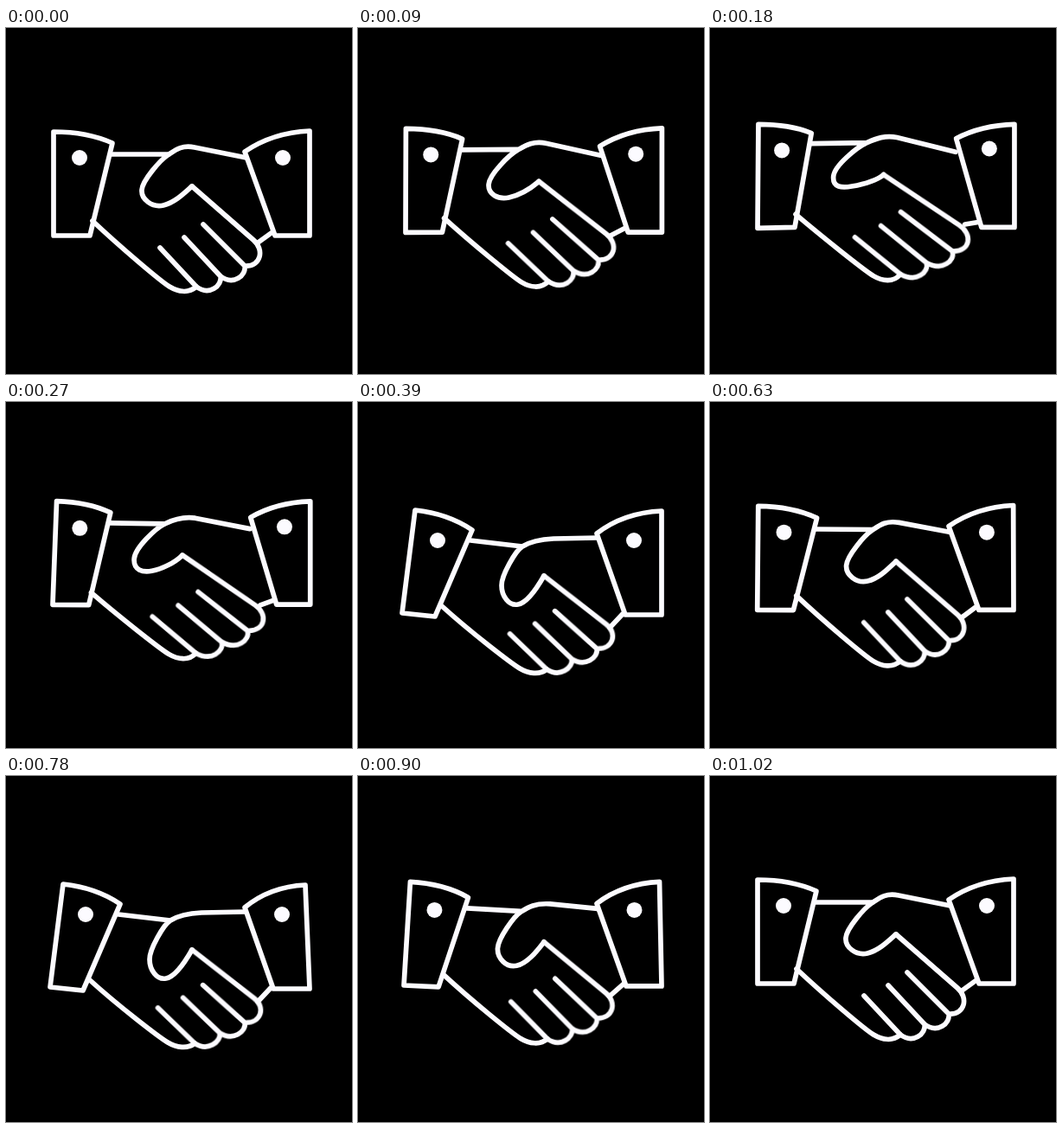
An HTML page without scripts for the animation above (3050 ms loop, 400 by 400 pixels).

```html
<!DOCTYPE html>
<html lang="en">
<head>
<meta charset="utf-8">
<title>Handshake</title>
<style>
html, body { margin: 0; width: 100%; height: 100%; overflow: hidden; background: #000; }
svg { display: block; width: 100%; height: 100%; }

path {
  fill: none;
  stroke: #fcfbff;
  stroke-width: 5.7;
  stroke-linecap: round;
  stroke-linejoin: round;
  vector-effect: non-scaling-stroke;
  animation: shake 3050ms cubic-bezier(.37, 0, .63, 1) infinite;
}

/* Each part names its poses; the shared keyframes time them. */
.cuff { marker-start: url(#button); }
#left {
  --rest: path("M85 150h0M55 120Q94 120 123 133L97 240L55 240Z");
  --up: path("M83 141h0M56 111Q92 111 117 121L98 230L55 231Z");
  --down: path("M92 160h0M66 125Q104 129 132 148L89 248L51 244Z");
}
#right {
  --rest: path("M320 150h0M351 119Q308 121 276 143L311 240L351 240Z");
  --up: path("M323 139h0M352 111Q314 112 285 127L314 230L352 230Z");
  --down: path("M319 160h0M351 126Q307 128 276 152L309 246L351 246Z");
  --tilt: path("M319 160h0M346 126Q305 128 276 152L309 246L351 246Z");
}
/* forearm, thumb, palm, wrist */
#hand {
  --rest: path("M122 146L187 146M278 150L218 138C203 135 196 141 187 147S158 176 157 187S169 208 182 205S206 191 215 183M220 299C211 307 199 305 189 299S133 254 100 223M290 249L308 236");
  --up: path("M116 133L181 132M284 143L216 126C203 123 192 127 181 132S143 158 142 171S152 184 163 182S191 176 200 169M220 284C212 294 199 292 189 286S131 242 99 215M295 226L310 224");
  --down: path("M130 160L190 167M276 157L226 158C207 159 198 162 190 167S166 200 166 212S174 236 185 234S207 215 215 201M218 309C210 316 197 314 187 308S130 266 97 236M291 261L306 245");
}
/* the fingers keep their shape and lean with the hand */
#fingers {
  --rest: path("M215 183l71 62c13 11 9 31-10 30l-48-48m48 48c2 11-13 23-28 12l-42-45m42 45c2 11-13 23-28 12l-42-45");
  --up: var(--rest);
  --down: var(--rest);
  --lean-up: matrix(1.13, -.05, .125, .993, 2, -18);
  --lean-down: matrix(1.03, -.025, -.019, .932, 1, 12);
  transform-origin: 286px 245px;
}

@keyframes shake {
  0%, 19.672%, 33.443%, 100% { d: var(--rest); transform: matrix(1, 0, 0, 1, 0, 0); }
  6.885% { d: var(--up); transform: var(--lean-up, none); }
  12.787% { d: var(--down); transform: var(--lean-down, none); }
  25.574% { d: var(--tilt, var(--down)); transform: var(--lean-down, none); }
}
</style>
</head>
<body>
<svg viewBox="0 0 400 400">
  <marker id="button" markerUnits="userSpaceOnUse" overflow="visible">
    <circle r="9" fill="#fcfbff"/>
  </marker>
  <path id="left" class="cuff"/>
  <path id="right" class="cuff"/>
  <path id="hand"/>
  <path id="fingers"/>
</svg>
</body>
</html>
```
